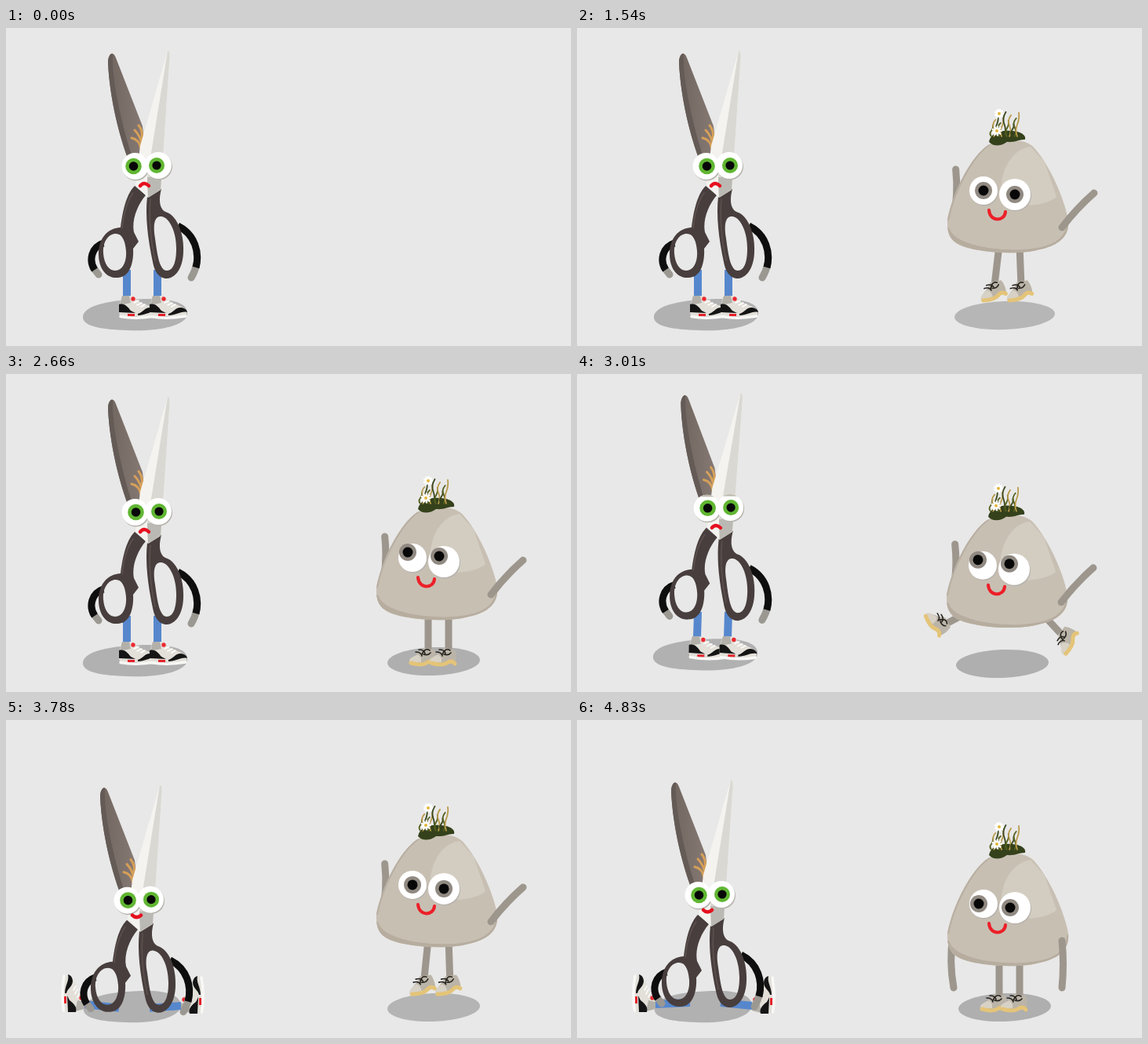
An HTML page for the animation above (6.3 s loop, 720 px wide and 405 px high).

```html
<!DOCTYPE html>
<html lang="en">
<head>
<meta charset="utf-8">
<title>Scissors and stone</title>
<style>
  html, body { margin: 0; width: 100%; height: 100%; overflow: hidden; background: #e8e8e8; }
  svg { display: block; width: 100vw; height: 100vh; }
  .line { fill: none; stroke-linecap: round; stroke-linejoin: round; }
  .flat { fill: none; stroke-linecap: butt; }
</style>
</head>
<body>
<svg viewBox="0 0 720 405">
  <defs>
    <linearGradient id="dark" x1="0" x2="1">
      <stop offset="0" stop-color="#71665f"/><stop offset="1" stop-color="#877a75"/>
    </linearGradient>
    <clipPath id="rockClip"><use href="#rockShape"/></clipPath>

    <g id="sneaker">
      <path fill="#e3e0d9" d="M-6 -1L8 -1C13 8 25 9 34 15Q38 18 37 25L-9 25Q-12 14-6 -1Z"/>
      <path fill="#b3b0aa" d="M-6 -1L3 -1L5 8L-9 11Z"/>
      <path fill="#151515" d="M-10 10C-3 8 1 13 5 18L11 21L-10 20ZM14 22C20 21 22 14 30 14Q37 15 38 20C30 18 24 24 14 24Z"/>
      <path fill="#e5212b" d="M1 22h9v3H1Z"/>
      <path class="line" stroke="#f8f8f6" stroke-width="3.5" d="M-8 25.5Q12 29 36 25"/>
      <path class="line" stroke="#fff" stroke-width="1.5" d="M9 8l6-3M13 11l6-3M18 13l5-3"/>
      <circle cx="8" cy="3" r="2.7" fill="#ec2830"/>
    </g>

    <g id="boot">
      <path fill="#bbb4a8" d="M-6 0L8 2Q11 10 9 19L-24 18C-25 12-15 11-6 0Z"/>
      <path fill="#d8d2c6" d="M-24 18C-25 12-18 11-13 8Q-8 12-9 18Z"/>
      <path class="line" stroke="#e4c478" stroke-width="5" d="M-22 19Q-8 23-2 19T8 20"/>
      <path class="line" stroke="#26241f" stroke-width="1.6" d="M-16 5q7 0 8 5M-12 2q7 0 8 5M-8 8q4-9 10-5M-6 8q6 2 9-2"/>
    </g>
  </defs>

  <path id="cutShadow" fill="#b1b1b1" d="M98 369C97 354 130 345 186 345C220 345 233 354 231 365C229 380 190 387 155 385C122 384 99 380 98 369Z"/>
  <g id="cutLegs" class="flat" stroke="#5687cd" stroke-width="10"><path/><path/></g>
  <use href="#sneaker"/><use href="#sneaker"/>

  <g id="cutter">
    <path class="line" stroke="#9b9892" stroke-width="9" d="M111 305L118 314M243 300Q241 310 236 318"/>
    <path class="flat" stroke="#0e0e0e" stroke-width="9" d="M124 274C109 279 105 296 113 308M219 252C241 263 247 286 242 305"/>
    <path fill="url(#dark)" d="M130 44C130 32 137 29 140 38L174 125L179 170L156 168C145 140 132 90 130 44Z"/>
    <path fill="#645a56" d="M130 44C130 36 134 31 136 33C134 60 146 120 162 168L156 168C145 140 132 90 130 44Z"/>
    <path class="line" stroke="#d6a059" stroke-width="3" d="M169 124Q175 131 173 142M164 130Q172 138 173 150M160 140Q170 142 172 154"/>
    <path fill="#483e3d" fill-rule="evenodd" d="M164 201L178 213C167 226 160 245 163 260L169 272L162 281C163 296 159 318 142 318C126 319 118 304 118 288C118 268 129 255 146 254C148 238 152 213 164 201ZM140 262C130 262 123 273 124 287C125 300 131 309 139 309C149 309 154 297 153 284C152 271 148 262 140 262Z"/>
    <path fill="#483e3d" fill-rule="evenodd" d="M180 215L198 205C194 220 196 230 203 234C218 238 227 262 226 284C226 301 219 318 205 319C194 319 189 309 187 298C181 270 177 240 180 215ZM198 240C189 239 187 251 190 268C193 291 196 309 205 309C213 309 217 298 217 281C217 259 208 241 198 240Z"/>
    <path class="line" stroke="#5d524f" stroke-width="1.5" d="M162 210Q151 225 148 255M184 218Q181 255 190 296"/>
    <path fill="#f4f3ef" d="M206 29C209 29 209 36 208 45L198 195L197 206L181 216L165 200L171 150Z"/>
    <path fill="#d9d8d2" d="M206 29C209 29 209 36 208 45L198 195L197 206L181 216L180 190Z"/>
    <path fill="#bbb9b3" d="M180 190L198 190L197 206L181 216Z"/>
    <g id="cutEyes"></g>
    <path id="cutMouth" class="line" stroke="#e5101f" stroke-width="4.5"/>
  </g>

  <ellipse id="rockShadow" ry="18" fill="#afafaf"/>
  <g id="rockLegs" class="flat" stroke="#9d968d" stroke-width="9"><path/><path/></g>
  <use href="#boot"/><use href="#boot"/>

  <g id="stone">
    <path id="armL" class="line" stroke="#9d968d" stroke-width="9" d="M0 0Q-5 34 1 67"/>
    <path id="rockShape" fill="#c8bfb3" d="M524 172C544 164 572 163 583 176C604 200 622 243 626 268C628 288 614 300 590 305C565 312 525 310 498 303C478 298 471 288 472 268C477 238 500 188 524 172Z"/>
    <g clip-path="url(#rockClip)">
      <path fill="#d3cdc1" d="M540 242C538 205 553 178 578 174L596 194L611 238C598 250 560 253 540 242Z"/>
      <path class="line" stroke="#b7ad9f" stroke-width="6" d="M472 280C482 308 560 313 592 305Q626 297 627 272"/>
      <path class="line" stroke="#b9afa2" stroke-width="5" d="M524 171C501 187 478 234 472 266"/>
    </g>
    <g id="meadow"></g>
    <g id="rockEyes"></g>
    <path class="line" stroke="#ec1f28" stroke-width="4" d="M525 255C526 270 545 270 546 257"/>
    <path id="armR" class="line" stroke="#9d968d" stroke-width="9" d="M0 0Q3 30 0 60"/>
  </g>
</svg>

<script>
const LOOP = 6300, STEP = 70;
const $ = id => document.getElementById(id);
const all = query => [...document.querySelectorAll(query)];
const move = (el, value) => el.setAttribute('transform', value);
const lerp = (a, b, k) => a + (b - a) * k;
const clamp = v => Math.max(0, Math.min(1, v));

// Timing shapes: a smooth step, a step that returns, and one arch.
const part = (t, from, to) => clamp((t - from) / (to - from));
const ease = (t, from, to) => { const k = part(t, from, to); return k * k * (3 - 2 * k); };
const hold = (t, from, to, ramp) => ease(t, from, from + ramp) - ease(t, to - ramp, to);
const arch = (t, from, to) => Math.sin(Math.PI * part(t, from, to));

// Crouch, fly and land, as a vertical offset.
function hop(t, start, height) {
  const takeoff = start + 95, landing = start + 505;
  return 9 * arch(t, start, takeoff) - height * arch(t, takeoff, landing) + 9 * arch(t, landing, start + 630);
}

function eye(x, y, r, iris, size, pupil) {
  return `<circle cx="${x + 1}" cy="${y + 1.5}" r="${r}" fill="#b7b4ae"/>
    <circle cx="${x}" cy="${y}" r="${r}" fill="#fff"/>
    <g class="iris"><circle cx="${x}" cy="${y}" r="${size}" fill="${iris}"/>
    <circle cx="${x}" cy="${y}" r="${pupil}" fill="#080808"/></g>`;
}

function lid(x, y, r) {
  return `<g class="lid"><circle cx="${x}" cy="${y}" r="${r}" fill="#bdb9ad"/>
    <path class="line" d="M${x - 9} ${y + 1}q9 2 18 0" stroke="#88847a" stroke-width="1.3"/></g>`;
}

function daisy(x, y, r) {
  let petals = '';
  for (let a = 0; a < 2 * Math.PI; a += Math.PI / 4.5) {
    petals += `M${x} ${y}l${r * Math.cos(a)} ${r * Math.sin(a)}`;
  }
  return `<path class="line" stroke="#fff" stroke-width="2.6" d="${petals}"/>
    <circle cx="${x}" cy="${y}" r="2" fill="#e2b63c"/>`;
}

function meadow() {
  const colors = ['#55601f', '#b99a4a', '#38451c'];
  let art = '<path fill="#34411b" d="M525 168C527 157 540 153 552 154C564 154 573 159 571 165C563 165 558 169 548 168C540 174 530 174 525 168Z"/>';
  for (let i = 0; i < 11; i++) {
    const q = (14 + i * 7 % 18) / 2, bend = i % 2 ? 3 : -3;
    art += `<path class="line" stroke="${colors[i % 3]}" stroke-width="1.8"
      d="M${528 + 3.3 * i} 161q${bend} ${-q / 2} 0 ${-q}t2 ${-q}"/>`;
  }
  return art + daisy(538, 132, 5) + daisy(535, 154, 5.5);
}

$('cutEyes').innerHTML = eye(164.5, 176, 17, '#60b632', 10.3, 5.8) + eye(194, 175, 17, '#60b632', 10, 5.6)
  + lid(164.5, 176, 17) + lid(194, 175, 17);
$('rockEyes').innerHTML = eye(518, 230, 18, '#918a82', 11, 6.5) + eye(558, 235, 20, '#918a82', 11, 6.5);
$('meadow').innerHTML = meadow();

const lids = all('.lid'), sneakers = all('use[href="#sneaker"]'), boots = all('use[href="#boot"]');
const cutIris = all('#cutEyes .iris'), rockIris = all('#rockEyes .iris');

function leg(el, hip, foot) {
  el.setAttribute('d', `M${hip}L${foot}`);
}

function drawCutter(t) {
  const sit = ease(t, 3430, 3640);
  const lift = ease(t, 2870, 3290) - sit;
  const rise = Math.max(0, lift);
  const spread = sit + .45 * arch(t, 3500, 3780);
  const x = -10 * sit;
  const y = 47 * sit - 20 * rise + 7 * arch(t, 3570, 3920) - 12 * arch(t, 3920, 4270);
  const tilt = 2 * rise - 3.2 * hold(t, 4060, 4830, 210);
  const blink = hold(t, 770, 1190, 140) + hold(t, 4060, 4550, 140) + .28 * rise;
  const look = -2 + 5 * ease(t, 140, 350) - 2 * ease(t, 350, 630);

  move($('cutter'), `translate(${x} ${y}) rotate(${tilt} 165 300)`);
  move($('cutShadow'), `translate(${-4 * (rise + sit)} ${-30 * rise}) translate(165 366) scale(${1 - .07 * sit} 1) translate(-165 -366)`);

  [[154, 99, 362], [193, 224, 364]].forEach(([hipX, sitX, sitY], i) => {
    const footX = lerp(hipX, sitX, spread) - 4 * rise;
    const footY = lerp(342, sitY, sit) - 26 * rise;
    const mirrored = i === 0 && sit > .4;
    leg($('cutLegs').children[i], [hipX + x, lerp(308, 313, sit) + y], [footX, footY + 2 * (1 - sit)]);
    move(sneakers[i], `translate(${footX} ${footY}) rotate(${(mirrored ? 90 : -90) * sit + 6 * rise}) scale(${mirrored ? -1 : 1} 1)`);
  });

  cutIris.forEach(el => move(el, `translate(${look} 0)`));
  lids.forEach(el => el.style.clipPath = `inset(0 0 ${100 * (1 - blink)}% 0)`);
  $('cutMouth').setAttribute('d', t < 3640 ? 'M171 201Q176 195 182 201' : 'M171 195Q176 200 182 195');
}

function drawStone(t) {
  const sit = ease(t, 2870, 3150) - ease(t, 3500, 3710);
  const y = -420 * (1 - ease(t, 0, 350)) + 12 * arch(t, 350, 560) + 4 * ease(t, 1330, 1540)
    + hop(t, 1330, 35) + hop(t, 2030, 82) + hop(t, 2730, 20) + hop(t, 3430, 26) + 59 * sit;
  const split = Math.min(1, 1.4 * arch(t, 2100, 2590)) + ease(t, 2870, 3080) - ease(t, 3500, 3780);
  const arms = ease(t, 1330, 1540) - .35 * arch(t, 3430, 3780) - ease(t, 3920, 4270);
  const glance = hold(t, 2450, 3360, 210);

  move($('stone'), `translate(${-2 * sit} ${y})`);
  move($('armL'), `translate(479 270) rotate(${184 * arms})`);
  move($('armR'), `translate(618 277) rotate(${-137 * arms})`);

  // Feet stay on the ground while the body dips, and dangle in the air.
  const hang = clamp(-y / 25) * (1 - split);
  const base = lerp(Math.min(y, 4), y, split);
  [[538, 485, 286, 450, 289, 72, -6], [564, 608, 294, 634, 307, -85, 2]].forEach(
    ([x, hipX, hipY, outX, outY, turn, drift], i) => {
      const footX = lerp(x, outX, split) + drift * hang;
      const footY = lerp(345, outY, split) + base;
      leg($('rockLegs').children[i], [lerp(x, hipX, split), lerp(300, hipY, split) + y], [footX, footY + 2]);
      move(boots[i], `translate(${footX} ${footY}) rotate(${turn * split - 20 * hang})`);
    });

  const look = glance + ease(t, 3780, 3990);
  rockIris.forEach(el => move(el, `translate(${-6 * look} ${-7 * glance})`));

  const shadow = $('rockShadow');
  shadow.setAttribute('rx', 64 - 5 * ease(t, 2100, 2660));
  shadow.setAttribute('opacity', clamp(1 + Math.min(0, y) / 180));
  move(shadow, `translate(${553 - 8 * ease(t, 1330, 1540) - 6 * sit} ${366 + 6 * sit}) rotate(-2)`);
}

function frame() {
  const t = Math.floor(performance.now() % LOOP / STEP) * STEP;
  drawCutter(t);
  drawStone(t);
  requestAnimationFrame(frame);
}
frame();
</script>
</body>
</html>
```
